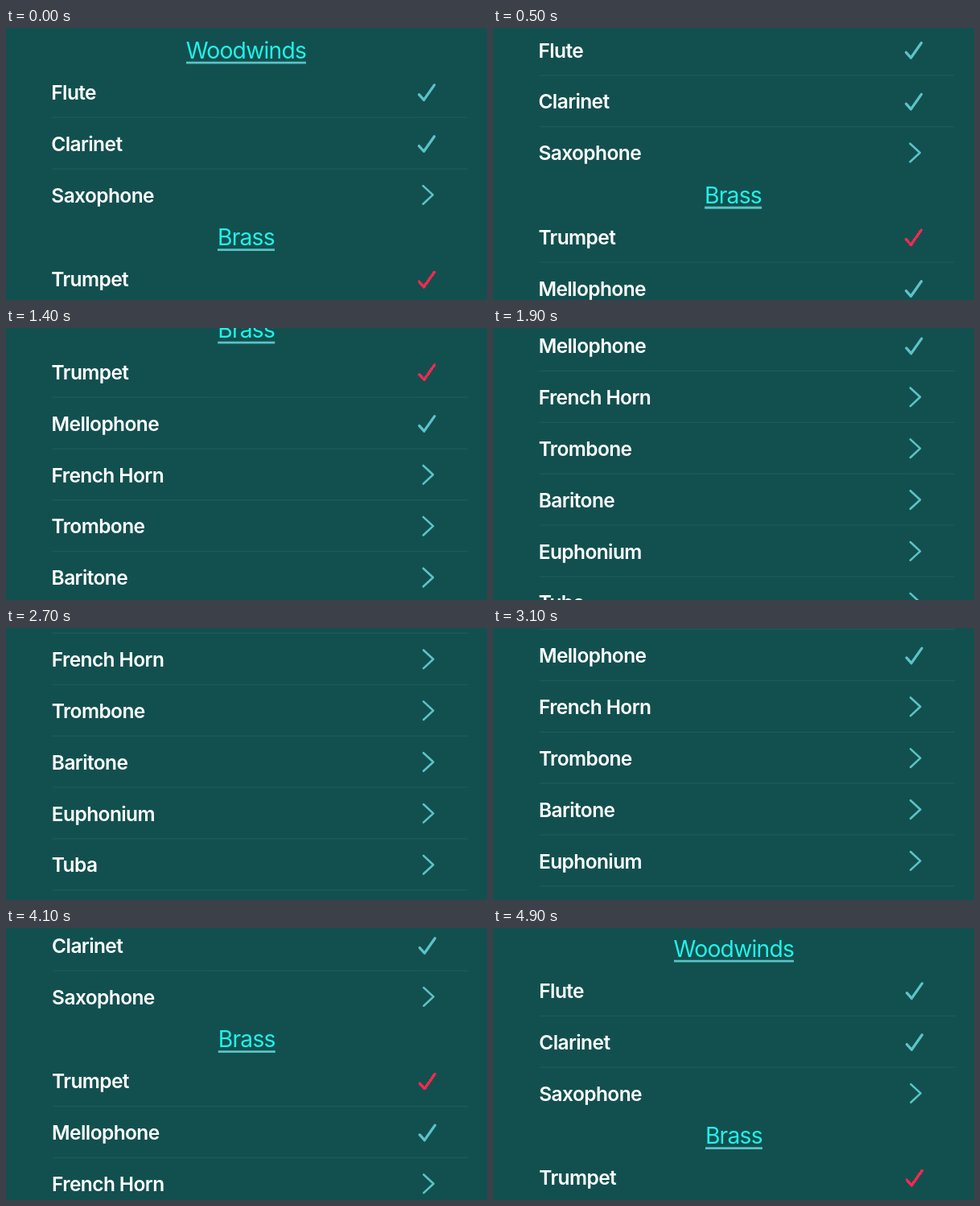
Animation, 598 px wide and 338 px high, one loop 5 s. Source, as an HTML page:

```html
<!DOCTYPE html>
<html lang="en">
<head>
<meta charset="utf-8">
<title>Instrument list</title>
<style>
html, body { margin: 0; width: 100%; height: 100%; overflow: hidden; background: #12504f; }
svg { display: block; width: 598px; height: 338px; }
text { font-family: Inter, "Open Sans", sans-serif; }
.row { font-size: 24.5px; font-weight: 600; letter-spacing: -.6px; fill: #fff; }
.head { font-size: 28.3px; letter-spacing: -.8px; fill: #22f1e8; text-anchor: middle; }
path { fill: none; stroke: #5bc3c8; stroke-linecap: round; stroke-linejoin: round; }
.check { stroke-width: 3.3; }
.next { stroke-width: 2.6; }
.red { stroke: #ff2850; shape-rendering: crispEdges; }
.under { stroke: #58c3c6; stroke-width: 2.8; stroke-linecap: butt; }
.rule { stroke: #1f5a58; stroke-width: 1.2; }
</style>
</head>
<body>
<svg viewBox="0 0 598 338"><g id="list"></g></svg>
<script>
const list = document.getElementById('list');
const LOOP = 5000, STEP = 100, PITCH = 63.85;
const ICONS = {
  check: 'M513.5 2.5L519.5 9.2L532.5 -9.3',
  next: 'M518.5 -11.8L530.7 -.5L518.5 10.8'
};

function add(tag, attrs, text = '') {
  const el = document.createElementNS('http://www.w3.org/2000/svg', tag);
  for (const k in attrs) el.setAttribute(k, attrs[k]);
  el.textContent = text;
  list.append(el);
}

function section(title, y, width, rows) {
  add('text', { class: 'head', x: 298.4, y: y + 9.7 }, title);
  add('path', { class: 'under', d: `M${298.5 - width / 2} ${y + 15.4}h${width}` });
  rows.forEach(([name, icon, red], i) => {
    const mid = y + 52.4 + i * PITCH;
    add('text', { class: 'row', x: 56.3, y: mid + 8.7 }, name);
    add('path', {
      class: icon + (red ? ' red' : ''), d: ICONS[icon],
      transform: `translate(0 ${mid})`
    });
    if (name !== 'Saxophone') add('path', { class: 'rule', d: `M58 ${mid + 31}H573` });
  });
}

section('Woodwinds', 27.8, 149, [
  ['Flute', 'check'], ['Clarinet', 'check'], ['Saxophone', 'next']
]);
section('Brass', 260.2, 71, [
  ['Trumpet', 'check', true], ['Mellophone', 'check'], ['French Horn', 'next'],
  ['Trombone', 'next'], ['Baritone', 'next'], ['Euphonium', 'next'], ['Tuba', 'next']
]);

// Scroll keys: seconds, offset, speed (px/s)
const KEYS = [
  [0, 0, 15], [.9, 136, 230], [1.9, 354, 130], [2.7, 401, -65],
  [3.5, 253, -215], [4.1, 122, -205], [4.9, 2, -25], [5, 0, 0]
];

function scrollAt(t) {
  const i = KEYS.findIndex(k => k[0] > t);
  const [t0, p0, v0] = KEYS[i - 1], [t1, p1, v1] = KEYS[i];
  const d = t1 - t0, u = (t - t0) / d, w = 1 - u;
  return w * w * (1 + 2 * u) * p0 + u * u * (3 - 2 * u) * p1
    + d * u * w * (w * v0 - u * v1);
}

const start = performance.now();
function draw() {
  const ms = Math.max(0, performance.now() - start) % LOOP;
  const t = Math.floor(ms / STEP) * STEP / 1000;
  list.setAttribute('transform', `translate(${t / 5} ${-scrollAt(t)})`);
  requestAnimationFrame(draw);
}
draw();
</script>
</body>
</html>
```
